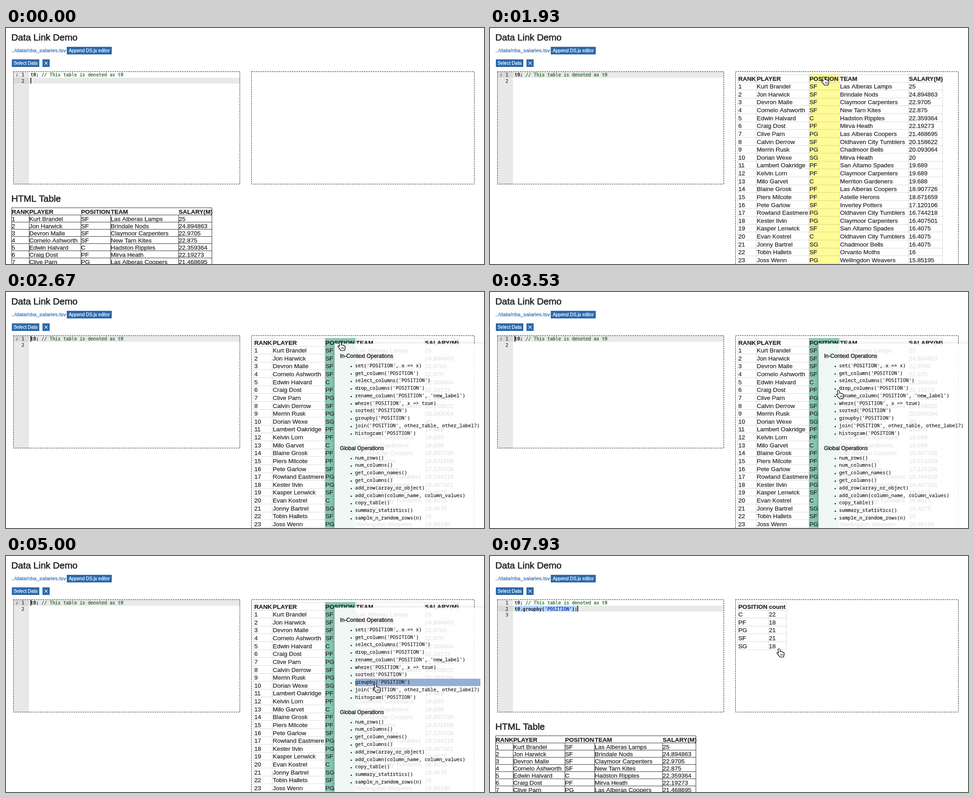
Animation of 1062x527 px, one loop 8 s. Source, as an HTML page with a canvas:

```html
<!DOCTYPE html>
<html lang="en">
<head>
<meta charset="utf-8">
<title>Data Link Demo</title>
<style>
html, body { margin: 0; width: 100%; height: 100%; overflow: hidden; background: #fff; }
canvas { display: block; }
</style>
</head>
<body>
<canvas id="stage" width="1062" height="527"></canvas>
<script>
const W = 1062, H = 527, LOOP = 8000;
const ctx = document.getElementById('stage').getContext('2d');

const SANS = '"Liberation Sans", Arial, sans-serif';
const CODE = '"DejaVu Sans Mono", monospace';
const MENU = '"Noto Sans Mono", "DejaVu Sans Mono", monospace';
const INK = '#262626', BLUE = '#2a6aae';

// Moments (ms) at which the page changes state
const SHOW_TABLE = 400, OPEN_MENU = 2400, RUN = 7000, LINT_OFF = 7600;

const HEADER = ['RANK', 'PLAYER', 'POSITION', 'TEAM', 'SALARY(M)'];
const ROWS = `Kurt Brandel|SF|Las Alberas Lamps|25
Jon Harwick|SF|Brindale Nods|24.894863
Devron Malle|SF|Claymoor Carpenters|22.9705
Cornelo Ashworth|SF|New Tarn Kites|22.875
Edwin Halvard|C|Hadston Ripples|22.359364
Craig Dost|PF|Mirva Heath|22.19273
Clive Parn|PG|Las Alberas Coopers|21.468695
Calvin Derrow|SF|Oldhaven City Tumblers|20.158622
Merrin Rusk|PG|Chadmoor Bells|20.093064
Dorian Wexe|SG|Mirva Heath|20
Lambert Oakridge|PF|San Altamo Spades|19.689
Kelvin Lorn|PF|Claymoor Carpenters|19.689
Milo Garvet|C|Merriton Gardeners|19.688
Blaine Grosk|PF|Las Alberas Coopers|18.907726
Piers Milcote|PF|Astelle Herons|18.671659
Pete Garlow|SF|Inverley Potters|17.120106
Rowland Eastmere|PG|Oldhaven City Tumblers|16.744218
Kester Ilvin|PG|Claymoor Carpenters|16.407501
Kasper Lenwick|SF|San Altamo Spades|16.4075
Evan Kostrel|C|Oldhaven City Tumblers|16.4075
Jonny Bartrel|SG|Chadmoor Bells|16.4075
Tobin Hallets|SF|Orvanto Moths|16
Joss Wenn|PG|Wellingdon Weavers|15.85195`
  .split('\n').map((line, i) => [String(i + 1), ...line.split('|')]);

const COUNTS = [['C', '22'], ['PF', '18'], ['PG', '21'], ['SF', '21'], ['SG', '18']];

const LOCAL_OPS = ["set('POSITION', x => x)", "get_column('POSITION')", "select_columns('POSITION')",
  "drop_columns('POSITION')", "rename_column('POSITION', 'new_label')", "where('POSITION', x => true)",
  "sorted('POSITION')", "groupby('POSITION')", "join('POSITION', other_table, other_label?)",
  "histogram('POSITION')"];
const GLOBAL_OPS = ['num_rows()', 'num_columns()', 'get_column_names()', 'get_columns()',
  'add_row(array_or_object)', 'add_column(column_name, column_values)', 'copy_table()',
  'summary_statistics()', 'sample_n_random_rows(n)'];

// Pointer path: time, x, y of the fingertip
const PATH = [
  [1150, 930, -22], [1700, 770, 62], [1860, 741, 109], [2450, 741, 109], [2650, 742, 112],
  [2850, 742, 112], [3480, 772, 218], [3900, 820.5, 256], [4300, 820.5, 256], [4750, 820.5, 286],
  [5400, 820.5, 286], [6300, 853, 287], [7420, 853, 287], [7930, 642, 207]
];

const HAND = new Path2D('M-2 2Q-2 0 0 0Q2 0 2.3 2L3 7Q3.6 5.8 5 6Q6.4 6.2 6.5 7.5Q7.5 6.4 8.7 7' +
  'Q9.8 7.5 9.8 9Q11.8 8.4 11.8 10.5L11.4 14Q10.5 16 10.3 18.5L2 18.5Q1.5 17 -1 14.5' +
  'Q-4 11 -4.5 9.8Q-4.7 8 -3 8.2Q-1.5 8.6 -.7 10Z');
const CREASES = new Path2D('M4 11.5V15.5M6.3 11.5V15.5M8.6 11.5V15.5');

// A thin outline of the same colour gives the text its slightly heavy look
function text(str, x, y, size, { font = SANS, color = INK, style = '', align = 'left', weight = 0.25 } = {}) {
  ctx.font = `${style} ${size}px ${font}`;
  ctx.textAlign = align;
  ctx.lineJoin = 'round';
  ctx.fillStyle = ctx.strokeStyle = color;
  ctx.lineWidth = weight;
  ctx.fillText(str, x, y);
  ctx.strokeText(str, x, y);
}

function rect(x, y, w, h, color) {
  ctx.fillStyle = color;
  ctx.fillRect(x, y, w, h);
}

const hLine = (x1, x2, y, color) => rect(x1, Math.round(y), x2 - x1 + 1, 1, color);
const vLine = (x, y1, y2, color) => rect(Math.round(x), y1, 1, y2 - y1, color);

function dashedBox(x, y, w, h) {
  ctx.strokeStyle = '#111';
  ctx.lineWidth = 1;
  ctx.setLineDash([3, 2]);
  ctx.strokeRect(x + 0.5, y + 0.5, w, h);
  ctx.setLineDash([]);
}

function button(label, x, y, w) {
  rect(x, y, w, 17, BLUE);
  text(label, x + w / 2, y + 12, 10.25, { color: '#fff', align: 'center' });
}

function drawHead() {
  text('Data Link Demo', 12, 28, 20.5, { weight: 0.7 });
  text('../data/nba_salaries.tsv', 12, 54, 11.8, { color: BLUE });
  button('Append DS.js editor', 135, 42, 100);
  button('Select Data', 13, 70, 61);
  rect(81, 70, 16, 17, BLUE);
  ctx.strokeStyle = '#fff';
  ctx.lineWidth = 1.2;
  ctx.stroke(new Path2D('M85.7 75.2L92.3 81.8M92.3 75.2L85.7 81.8'));
}

function caretOn(t) {
  if (t < SHOW_TABLE || t >= OPEN_MENU) return true;
  return (t - SHOW_TABLE) % 1000 < 500;
}

function drawEditor(t) {
  const top = 98, lineH = 13.4, done = t >= RUN;
  const active = t < SHOW_TABLE || done ? 1 : 0;
  const y = Math.round(top + active * lineH);
  const code = (str, x, row, color = '#000') =>
    text(str, x, top + 10.2 + row * lineH, 10.07, { font: CODE, color });

  rect(17, top, 34, 251, '#e8e8e8');
  rect(17, y, 34, 13, '#dadada');
  rect(51, y, 469, 13, '#e9e9e9');
  if (done) rect(55, y, 140, 13, '#b5d5ff');

  for (let i = 0; i < (done ? 3 : 2); i++) {
    text(String(i + 1), 40.5, top + 10.2 + i * lineH, 10.07, { font: CODE, color: '#333', align: 'right' });
  }
  if (t < LINT_OFF) {
    text('i', 23, 108, 10.5, { font: '"Liberation Serif", serif', style: 'italic', color: '#444' });
  }
  code('t0;', 54.7, 0);
  code('// This table is denoted as t0', 79, 0, '#1c5f1d');
  if (done) {
    code('t0.groupby(', 54.7, 1);
    code("'POSITION'", 121.4, 1, '#1a1aa6');
    code(');', 182, 1);
  }
  if (caretOn(t)) rect(done ? 194 : 54.5, y, 1.6, 13, '#000');
  dashedBox(16, 97, 503, 251);
}

function drawPageTable() {
  const cols = [12, 51, 166, 232, 383, 457], top = 401, rowH = 16;
  text('HTML Table', 12, 388, 20.4, { weight: 0.7 });
  [HEADER, ...ROWS.slice(0, 7)].forEach((row, r) => {
    hLine(12, 457, top + r * rowH, '#333');
    row.forEach((cell, c) => text(cell, cols[c] + 0.8, top + 13.6 + r * rowH, 13.5, { style: r ? '' : 'bold' }));
  });
  cols.forEach((x, i) => vLine(x, i % 5 ? top + rowH : top, H, '#333'));
}

function drawGrid(rows, cols, tint) {
  const top = 103, rowH = 17.62, left = cols[0], right = cols[cols.length - 1];
  const bottom = Math.min(H, Math.round(top + rows.length * rowH));
  if (tint) rect(709, top, 67, bottom - top, tint);
  for (let r = 0; r <= rows.length; r++) hLine(left, right, top + r * rowH, 'rgba(120,120,120,.27)');
  cols.forEach(x => vLine(x, top, bottom, 'rgba(120,120,120,.27)'));
  rows.forEach((row, r) => row.forEach((cell, c) =>
    text(cell, cols[c] + 1.8, top + 14.6 + r * rowH, 13.5, { style: r ? '' : 'bold' })));
}

function drawMenu(mouse) {
  const x = 730, y = 115, pitch = 16.78;
  ctx.save();
  ctx.beginPath();
  ctx.rect(0, 0, W, H);
  ctx.rect(x, y, W, H);
  ctx.clip('evenodd');
  ctx.shadowColor = 'rgba(0,0,0,.28)';
  ctx.shadowBlur = 10;
  ctx.shadowOffsetY = 3;
  rect(x, y, W, H, '#fff');
  ctx.restore();
  rect(x, y, W, H, 'rgba(255,255,255,.87)');

  const group = (title, ops, mid) => {
    text(title, 742, mid + 4.2, 12.1, { color: '#222', weight: 0.5 });
    ops.forEach((op, i) => {
      const cy = mid + 21.4 + i * pitch;
      const over = mouse.x >= 776 && Math.abs(mouse.y - cy) < pitch / 2;
      if (over) rect(776, Math.round(cy - 7.8), 278, 16.5, '#93afd6');
      text(op, 775.6, cy + 3.6, 10.74, { font: MENU, color: '#222' });
      ctx.beginPath();
      ctx.arc(767, cy + 2, 1.5, 0, 7);
      ctx.fill();
    });
  };
  group('In-Context Operations', LOCAL_OPS, 142.8);
  group('Global Operations', GLOBAL_OPS, 348.6);
}

function pointerAt(t) {
  let i = PATH.findIndex(p => p[0] > t);
  if (i < 0) i = PATH.length;
  const a = PATH[Math.max(0, i - 1)], b = PATH[Math.min(i, PATH.length - 1)];
  const u = b[0] > a[0] ? (t - a[0]) / (b[0] - a[0]) : 0;
  const e = u * u * (3 - 2 * u);
  return { x: a[1] + (b[1] - a[1]) * e, y: a[2] + (b[2] - a[2]) * e };
}

function drawHand({ x, y }) {
  ctx.save();
  ctx.translate(x, y);
  ctx.shadowColor = 'rgba(0,0,0,.3)';
  ctx.shadowBlur = 2;
  ctx.shadowOffsetY = 1;
  ctx.fillStyle = '#fff';
  ctx.fill(HAND);
  ctx.shadowColor = 'transparent';
  ctx.strokeStyle = '#000';
  ctx.lineJoin = 'round';
  ctx.lineWidth = 1.2;
  ctx.stroke(HAND);
  ctx.lineWidth = 0.9;
  ctx.stroke(CREASES);
  ctx.restore();
}

function draw(t) {
  const mouse = pointerAt(t);
  const full = t >= SHOW_TABLE && t < RUN;
  const menu = t >= OPEN_MENU && t < RUN;

  rect(0, 0, W, H, '#fff');
  drawHead();
  drawEditor(t);
  dashedBox(545, 97, 495, full ? 500 : 251);

  if (full) {
    const hover = mouse.y > 103 && mouse.x > 709 && mouse.x < 776;
    drawGrid([HEADER, ...ROWS], [550, 591, 708, 776, 929, 1005],
      menu ? '#88cab6' : hover ? '#fffb98' : null);
  } else {
    drawPageTable();
    if (t >= RUN) drawGrid([['POSITION', 'count'], ...COUNTS], [550, 618, 658]);
  }
  if (menu) drawMenu(mouse);
  drawHand(mouse);
}

const start = performance.now();
function frame() {
  draw((performance.now() - start) % LOOP);
  requestAnimationFrame(frame);
}
frame();
</script>
</body>
</html>
```
